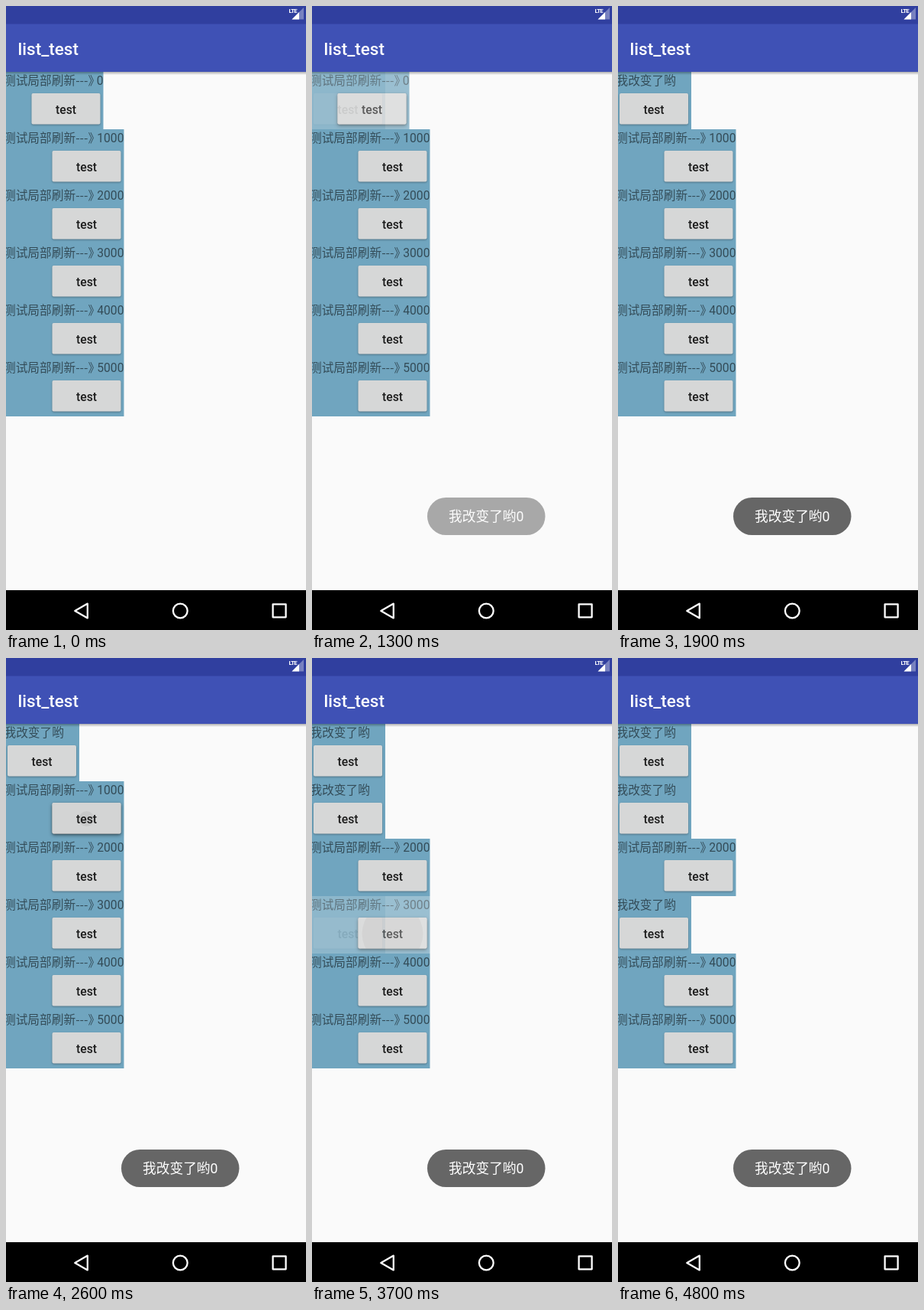
Animation of 393 by 815 pixels, one loop 5.7 s. Source, as an HTML page:

```html
<!DOCTYPE html>
<html lang="zh">
<head>
<meta charset="utf-8">
<title>list_test</title>
<style>
html, body { margin: 0; width: 100%; height: 100%; overflow: hidden; background: #fafafa; }
svg { display: block; width: 393px; height: 815px; }
text { font-family: Roboto, "Noto Sans CJK SC", "Noto Sans CJK", sans-serif; white-space: pre; }
.title { font-size: 22.5px; font-weight: 500; fill: #fff; }
.lte { font-size: 7.8px; font-weight: 700; fill: #fff; letter-spacing: -.8px; }
.label { font-size: 15.7px; fill: #000; fill-opacity: .54; }
.cjk { font-family: "Noto Sans CJK SC", "Noto Sans CJK", sans-serif; }
.caption { font-size: 15.75px; font-weight: 500; text-anchor: middle; fill: #000; fill-opacity: .87; }
.row { fill: #70a5bf; }
.button { fill: #d6d7d7; filter: drop-shadow(0 1px 1px rgba(0, 0, 0, .32)); }
.lift { fill: #d3d4d4; filter: drop-shadow(0 2px 2.5px rgba(0, 0, 0, .4)); }
.ripple { fill: #000; fill-opacity: .055; }
.toast text { font-size: 17.7px; fill: #fff; text-anchor: middle; }
.nav { fill: none; stroke: #fff; stroke-width: 2.3; stroke-linejoin: round; }

.fresh, .press { opacity: 0; }
.old, .fresh, .press, .toast { animation: 5700ms step-end infinite; }
.r0 .old { animation-name: out0; }
.r0 .fresh { animation-name: in0; }
.r0 .press { animation-name: press0; }
.r1 .old { animation-name: out1; }
.r1 .fresh { animation-name: in1; }
.r1 .press { animation-name: press1; }
.r3 .old { animation-name: out3; }
.r3 .fresh { animation-name: in3; }
.r3 .press { animation-name: press3; }
.toast { animation-name: toast; }

@keyframes out0 { 0% { opacity: 1 } 22.805% { opacity: .7 } 24.56% { opacity: .3 } 26.315%, 100% { opacity: 0 } }
@keyframes in0 { 0% { opacity: 0 } 22.805% { opacity: .3 } 24.56% { opacity: .7 } 26.315%, 100% { opacity: 1 } }
@keyframes press0 { 0% { opacity: 0 } 21.05%, 100% { opacity: 1 } }
@keyframes out1 { 0% { opacity: 1 } 47.365% { opacity: .45 } 49.12%, 100% { opacity: 0 } }
@keyframes in1 { 0% { opacity: 0 } 47.365% { opacity: .55 } 49.12%, 100% { opacity: 1 } }
@keyframes press1 { 0% { opacity: 0 } 45.61%, 100% { opacity: 1 } }
@keyframes out3 { 0% { opacity: 1 } 64.91% { opacity: .7 } 66.665% { opacity: .3 } 68.42%, 100% { opacity: 0 } }
@keyframes in3 { 0% { opacity: 0 } 64.91% { opacity: .3 } 66.665% { opacity: .7 } 68.42%, 100% { opacity: 1 } }
@keyframes press3 { 0% { opacity: 0 } 63.155%, 100% { opacity: 1 } }
@keyframes toast { 0% { opacity: 0 } 21.05% { opacity: .13 } 22.805% { opacity: .55 } 24.56% { opacity: .9 } 26.315%, 100% { opacity: 1 } }
</style>
</head>
<body>
<svg viewBox="0 0 393 815">
  <defs>
    <linearGradient id="shade" x2="0" y2="1">
      <stop stop-color="#000" stop-opacity=".3"/>
      <stop offset="1" stop-color="#000" stop-opacity="0"/>
    </linearGradient>
  </defs>
  <rect width="393" height="815" fill="#fafafa"/>
  <g id="list"></g>

  <rect y="86" width="393" height="4" fill="url(#shade)"/>
  <rect y="23" width="393" height="63" fill="#3f51b5"/>
  <rect width="393" height="23.5" fill="#303f9f"/>
  <text class="title" x="15.5" y="63.5">list_test</text>
  <text class="lte" x="370.5" y="9">LTE</text>
  <path d="M374.5 17.5 390 2v15.5z" fill="#fff" fill-opacity=".35"/>
  <path d="M374.5 17.5 384 8v9.5z" fill="#fff"/>

  <g class="toast">
    <rect x="151" y="642" width="154.5" height="49" rx="24.5" fill="#666"/>
    <text x="228.3" y="673.3">我改变了哟0</text>
  </g>

  <rect y="763" width="393" height="52" fill="#000"/>
  <g class="nav">
    <path d="M90.3 790 106.8 780.6V799.4z"/>
    <circle cx="228.3" cy="790" r="9.4"/>
    <rect x="349.6" y="781.3" width="17" height="17"/>
  </g>
</svg>
<script>
const changed = [0, 1, 3];
const ripples = { 1: 10, 3: 40 };

const box = (cls, x) => `<rect class="${cls}" x="${x}" y="28" width="90" height="40.5" rx="2"/>`;

function item(width, label, press = "") {
  const x = width - 94;
  return `<rect class="row" width="${width}" height="75"/>${label}${box("button", x)}${press}
    <text class="caption" x="${x + 45}" y="54.5">test</text>`;
}

function pressed(i, x) {
  const r = ripples[i];
  const ripple = r ? `<clipPath id="clip${i}">${box("", x)}</clipPath>
    <circle class="ripple" cx="${x + 45}" cy="49" r="${r}" clip-path="url(#clip${i})"/>` : "";
  return `<g class="press">${box("lift", x)}${ripple}</g>`;
}

function row(i) {
  const width = i ? 154.5 : 127.5;
  const label = `<text class="label" x="-3" y="16.8">测试局部刷新<tspan class="cjk">---》</tspan></text>
    <text class="label" x="${width}" y="16.8" text-anchor="end">${i * 1000}</text>`;
  const changes = changed.includes(i);
  const fresh = changes
    ? `<g class="fresh">${item(96, '<text class="label" x="-2.5" y="16.8">我改变了哟</text>')}</g>` : "";
  const press = changes ? pressed(i, width - 94) : "";
  return `<g class="r${i}" transform="translate(0 ${86 + i * 75})">${fresh}
    <g class="old">${item(width, label, press)}</g></g>`;
}

document.getElementById("list").innerHTML = [0, 1, 2, 3, 4, 5].map(row).join("");
</script>
</body>
</html>
```
